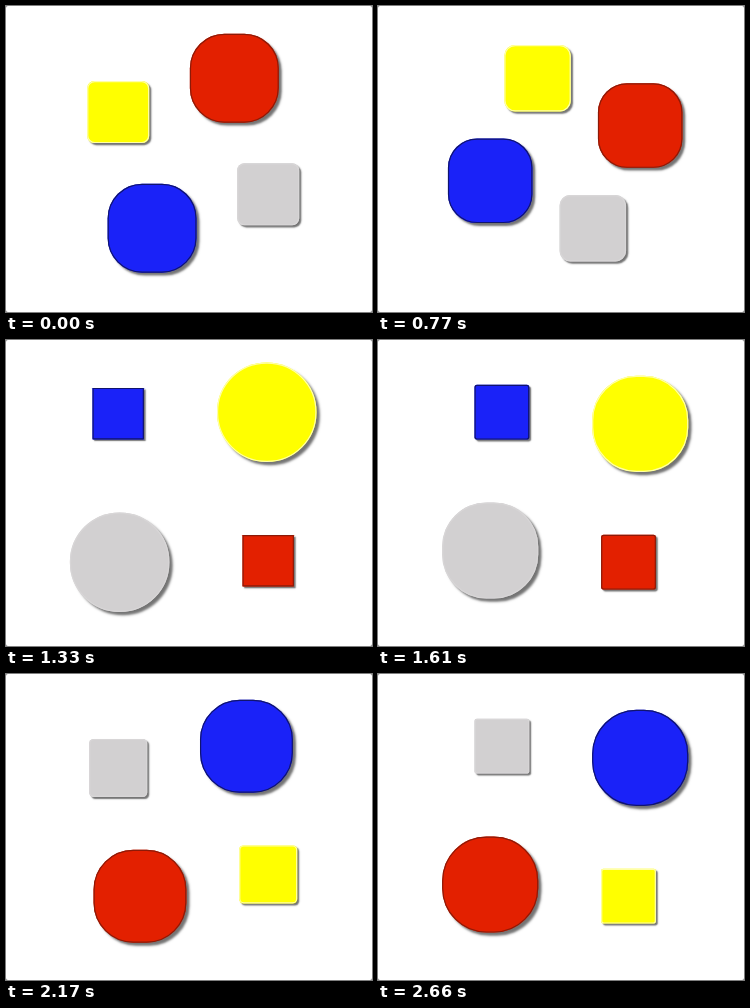
An HTML page with a canvas that plays this animation: 366 px wide and 306 px high, repeating every 2.73 s.

```html
<!DOCTYPE html>
<html lang="en">
<head>
<meta charset="utf-8">
<title>Orbiting shapes</title>
<style>
  html, body { margin: 0; width: 100%; height: 100%; overflow: hidden; background: #777; }
  canvas { display: block; border-radius: 2px; }
</style>
</head>
<body>
<canvas width="366" height="306"></canvas>
<script>
const ctx = document.querySelector('canvas').getContext('2d');
const STEP = 70, STEPS = 39, SIDE_STEPS = 15, START = 5.04;
const SMALL = 51, LARGE = 100;

// Corners run clockwise from the top left.
const corners = [[112.2, 72.2], [262.2, 72.2], [262.2, 222.2], [112.2, 222.2]];
const shapes = [
  { fill: '#ffff00', edge: '#ffffa8' },
  { fill: '#e32000', edge: '#8c1a08' },
  { fill: '#d2d0d1', edge: '#d8d6d7' },
  { fill: '#1a22f8', edge: '#10146e' },
];

const mix = (a, b, k) => a + (b - a) * k;
const easeInOut = u => u < 0.5 ? 2 * u * u : 1 - 2 * (1 - u) ** 2;

function drawShape({ fill, edge }, corner, k) {
  const from = corners[corner], to = corners[(corner + 1) % 4];
  const roundness = corner % 2 ? 1 - k : k;
  const size = mix(SMALL, LARGE, roundness);
  const x = mix(from[0], to[0], k) - size / 2;
  const y = mix(from[1], to[1], k) - size / 2;
  const box = inset => {
    const side = size - 2 * inset;
    ctx.beginPath();
    ctx.roundRect(x + inset, y + inset, side, side, side / 2 * roundness);
  };

  ctx.save();
  ctx.shadowColor = 'rgba(0, 0, 0, 0.55)';
  ctx.shadowOffsetX = ctx.shadowOffsetY = size * 0.033;
  ctx.shadowBlur = size * 0.025;
  ctx.fillStyle = fill;
  box(0);
  ctx.fill();
  ctx.restore();

  ctx.strokeStyle = edge;
  ctx.lineWidth = 1.2;
  box(0.6);
  ctx.stroke();
}

function draw(now) {
  const step = Math.floor(now / STEP) % STEPS;
  const turn = (step - START) / SIDE_STEPS;
  const side = Math.floor(turn);
  const k = easeInOut(turn - side);
  ctx.fillStyle = '#fff';
  ctx.fillRect(0, 0, 366, 306);
  shapes.forEach((shape, i) => drawShape(shape, (side + i + 4) % 4, k));
  requestAnimationFrame(draw);
}
requestAnimationFrame(draw);
</script>
</body>
</html>
```
